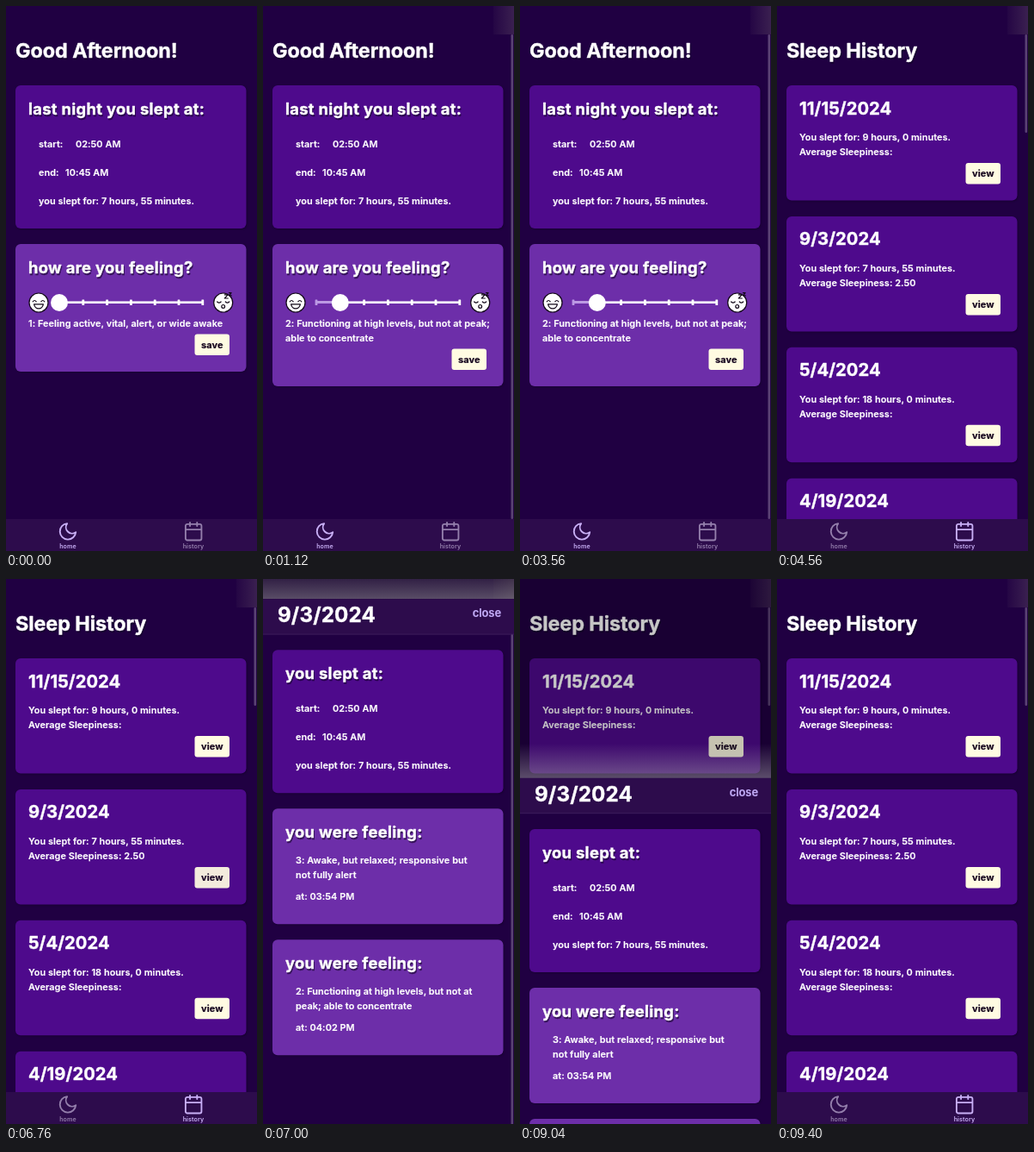
These frames come from a looping animation (292 by 632 pixels, 9600 ms). An HTML page:

```html
<!DOCTYPE html>
<html lang="en">
<head>
<meta charset="utf-8">
<title>Sleep diary</title>
<style>
  html, body { margin: 0; width: 100%; height: 100%; overflow: hidden; background: #200042; }
  svg { display: block; width: 100vw; height: 100vh; }
  text {
    font-family: Inter, "Open Sans", sans-serif;
    font-weight: 600; font-size: 10.9px; letter-spacing: .06px;
    fill: #fff; stroke: #fff; stroke-width: .2px; stroke-linejoin: round;
    white-space: pre;
  }
  .title, .head, .date, .big { font-weight: 700; stroke-width: .4px; }
  .title { font-size: 23.4px; letter-spacing: -.08px; }
  .head { font-size: 18.4px; letter-spacing: .3px; }
  .date { font-size: 20.2px; letter-spacing: .05px; }
  .big { font-size: 24.2px; letter-spacing: .15px; }
  .title, .head { filter: drop-shadow(1.2px 2px .6px rgba(15, 0, 35, .6)); }
  .card { filter: drop-shadow(1px 1px 1px rgba(10, 0, 25, .4)); }
  .btn { fill: #17071f; stroke: #17071f; font-weight: 700; font-size: 11px; }
  .ask { font-size: 11.6px; font-weight: 700; letter-spacing: -.06px; }
  .link { fill: #c3adf8; stroke: #c3adf8; font-size: 12px; }
  .strong { font-weight: 700; }
  .close { font-size: 13px; letter-spacing: -.1px; }
  .tab text { font-size: 7.1px; letter-spacing: .1px; stroke: none; fill: currentColor; }
  .icon { fill: none; stroke: currentColor; stroke-width: 1.8; stroke-linecap: round; stroke-linejoin: round; }
  .ink { fill: none; stroke: #120818; stroke-width: 1.2; stroke-linecap: round; stroke-linejoin: round; }
  .ink.face { fill: #fff; }
</style>
</head>
<body>
<svg id="stage" viewBox="0 0 292 632" preserveAspectRatio="none"></svg>
<script>
const W = 292, H = 632, LOOP = 9600, STEP = 40;
const BG = '#200042', DEEP = '#4e0a8c', SOFT = '#6d2ea9', BAR = '#2d0c4c', CREAM = '#fffbe2';
const SCROLL = '#5b4274', ACTIVE = '#c9b0f6', IDLE = '#947fac';

const rect = (x, y, w, h, fill, r = 0, more = '') =>
  `<rect x="${x}" y="${y}" width="${w}" height="${h}" rx="${r}" fill="${fill}" ${more}/>`;
const text = (x, y, str, cls = '', anchor = 'start') =>
  `<text x="${x}" y="${y}" class="${cls}" text-anchor="${anchor}">${str}</text>`;
const group = (id, body, more = '') => `<g id="${id}" ${more}>${body}</g>`;
const ink = d => `<path class="ink" d="${d}"/>`;
const card = (y, h, fill) => rect(11, y, 268.5, h, fill, 6, 'class="card"');
const button = (y, label, id = '') =>
  group(id, rect(219.5, y, 40.5, 24.5, CREAM, 3) + text(239.8, y + 16.2, label, 'btn', 'middle'));
const scrollbar = (y, h) => rect(288.5, y, 2.6, h, SCROLL, 1.3);

const sleepCard = (y, title) => card(y, 166, DEEP) +
  text(26, y + 34, title, 'head') +
  text(38, y + 72, 'start:') + text(81, y + 72, '02:50 AM') +
  text(38, y + 105, 'end:') + text(69, y + 105, '10:45 AM') +
  text(38, y + 138, 'you slept for: 7 hours, 55 minutes.');

const face = (x, body) =>
  `<g transform="translate(${x} 344)"><circle r="11" class="ink face"/>${body}</g>`;
const happyFace = face(38,
  ink('M-6.8-1.2q2-2.6 4 0M2.8-1.2q2-2.6 4 0') + ink('M-5.4 1.8h10.8q-1 5-5.4 5t-5.4-5z'));
const sleepyFace = face(252.7,
  ink('M-7-1q2.2 2.4 4.4 0M2.6-1q2.2 2.4 4.4 0') +
  '<circle class="ink" cy="4.4" r="1.9"/>' +
  ink('M1.6-9.2h3.8l-3.8 4.2h4M6.8-11.4h2.6l-2.6 3.2h2.8'));

function slider(level) {
  const x0 = 62, gap = 27.8, x = x0 + gap * (level - 1);
  let s = rect(x0, 342.4, gap * 6, 2.6, '#fff');
  for (let i = 0; i < 7; i++)
    s += rect(x0 + gap * i - 1.4, 340.4, 2.8, 6.6, i < level - 1 ? '#bb98e4' : '#fff', .5);
  if (level > 1) s += rect(x0, 342.4, x - x0, 2.6, '#bb98e4');
  return s + `<circle cx="${x}" cy="344" r="10" fill="#fff"/>`;
}
function feelCard(level, lines) {
  const extra = 17 * (lines.length - 1);
  return card(276, 148 + extra, SOFT) + text(26, 310, 'how are you feeling?', 'head') +
    slider(level) + happyFace + sleepyFace +
    lines.map((l, i) => text(26, 371.5 + 17 * i, l)).join('') +
    button(380.5 + extra, 'save');
}
function nightCard(i, date, hours, avg) {
  const y = 92 + 151.9 * i;
  return card(y, 133.5, DEEP) + text(26, y + 33.5, date, 'date') +
    text(26, y + 64, `You slept for: ${hours} minutes.`) +
    text(26, y + 81, 'Average Sleepiness: ' + avg) +
    button(y + 90, 'view', 'view' + i);
}
const moodCard = (y, lines, time) => card(y, 134, SOFT) +
  text(26, y + 34, 'you were feeling:', 'head') +
  lines.map((l, i) => text(38, y + 64 + 17 * i, l)).join('') +
  text(38, y + 106, 'at: ' + time);

const gradient = (id, dir, color, a, b) =>
  `<linearGradient id="${id}" ${dir}><stop offset="0" stop-color="${color}" stop-opacity="${a}"/>` +
  `<stop offset="1" stop-color="${color}" stop-opacity="${b}"/></linearGradient>`;

const defs = '<defs>' +
  gradient('glow', 'x1="0" y1="0" x2="0" y2="1"', '#b8b8b8', 0, .42) +
  gradient('edge', 'x1="0" y1="0" x2="1" y2="0"', '#503a5c', .1, .55) + '</defs>';

const home = text(11, 60, 'Good Afternoon!', 'title') + sleepCard(92, 'last night you slept at:') +
  group('mood1', feelCard(1, ['1: Feeling active, vital, alert, or wide awake'])) +
  group('mood2', feelCard(2, ['2: Functioning at high levels, but not at peak;', 'able to concentrate'])) +
  group('homeBar', scrollbar(33, 562));

const past = text(11, 60, 'Sleep History', 'title') +
  nightCard(0, '11/15/2024', '9 hours, 0', '') +
  nightCard(1, '9/3/2024', '7 hours, 55', '2.50') +
  nightCard(2, '5/4/2024', '18 hours, 0', '') +
  nightCard(3, '4/19/2024', '8 hours, 0', '') +
  scrollbar(33, 114);

const tabs = rect(0, 595, W, 37, BAR) +
  group('homeTab', '<path class="icon" transform="translate(59.6 597) scale(1.03)" d="M21 12.79A9 9 0 1 1 11.21 3 7 7 0 0 0 21 12.79z"/>' +
    text(72, 629, 'home', '', 'middle'), 'class="tab"') +
  group('pastTab', '<path class="icon" transform="translate(205.8 596.8) scale(1.03)" d="M5 4h14a2 2 0 0 1 2 2v14a2 2 0 0 1-2 2H5a2 2 0 0 1-2-2V6a2 2 0 0 1 2-2zM16 2v4M8 2v4M3 10h18"/>' +
    text(218, 629, 'history', '', 'middle'), 'class="tab"');

const dialog = rect(48, 278, 195, 78, '#32124f', 10, 'opacity=".97"') +
  text(145.3, 304, 'Are you sure you wanna save?', 'ask', 'middle') +
  rect(48, 322, 195, .8, '#54386f') + rect(144.8, 322, .8, 34, '#54386f') +
  text(95.5, 343, 'no', 'link', 'middle') + text(194.3, 343, 'yes', 'link strong', 'middle');

const sheet = rect(0, -40, W, 40, 'url(#glow)') + rect(0, 0, W, H + 2, BG) +
  rect(0, 0, W, 41, BAR) + rect(0, 40.4, W, .8, '#40215f') +
  text(17, 27, '9/3/2024', 'big') + text(277, 21, 'close', 'link close', 'end') +
  sleepCard(59, 'you slept at:') +
  moodCard(243, ['3: Awake, but relaxed; responsive but', 'not fully alert'], '03:54 PM') +
  moodCard(395, ['2: Functioning at high levels, but not at', 'peak; able to concentrate'], '04:02 PM') +
  group('sheetBar', scrollbar(41, 591));

document.getElementById('stage').innerHTML = defs + rect(0, 0, W, H, BG) +
  group('home', home) + group('past', past) + tabs +
  group('corner', rect(268, 0, 24, 33, 'url(#edge)')) +
  group('dim', rect(0, 0, W, H, '#000')) + group('dialog', dialog) + group('sheet', sheet);

const el = id => document.getElementById(id);
const clamp = v => Math.max(0, Math.min(1, v));
const ramp = (t, a, b) => clamp((t - a) / (b - a));
const ease = v => v * v * (3 - 2 * v);
const show = (id, on) => el(id).setAttribute('visibility', on ? 'inherit' : 'hidden');
const fade = (id, v) => el(id).setAttribute('opacity', v.toFixed(3));

// Critically damped spring: share of the distance still to go.
function spring(t, start) {
  const u = Math.max(0, t - start) * .0213;
  return (1 + u) * Math.exp(-u);
}

function draw(t) {
  const onHome = t < 4400;
  show('home', onHome);
  show('past', !onHome);
  show('mood1', t < 440);
  show('mood2', onHome && t >= 440);
  show('homeBar', t >= 1120 && onHome);
  show('corner', t >= 1120);
  el('homeTab').style.color = onHome ? ACTIVE : IDLE;
  el('pastTab').style.color = onHome ? IDLE : ACTIVE;

  const opening = ease(ramp(t, 1960, 2200));
  const ask = opening * (1 - ease(ramp(t, 3240, 3560)));
  const scale = 1 + .15 * (1 - opening);
  fade('dialog', ask);
  el('dialog').setAttribute('transform', `translate(145.5 317) scale(${scale}) translate(-145.5 -317)`);

  let away = 1;
  if (t >= 6760 && t < 7240) away = spring(t, 6760);
  else if (t >= 7240 && t < 9000) away = 0;
  else if (t >= 9000 && t < 9400) away = 1 - spring(t, 8980);
  show('sheet', away < 1);
  el('sheet').setAttribute('transform', `translate(0 ${(away * H).toFixed(2)})`);
  fade('sheetBar', 1 - ramp(t, 8120, 8360));
  fade('dim', .3 * ask + .35 * (1 - away));
  fade('view1', 1 - .5 * ramp(t, 6740, 6900) + .5 * ramp(t, 6900, 7100));
}

let start;
function tick(now) {
  if (start === undefined) start = now;
  const t = (now - start) % LOOP;
  draw(Math.floor(t / STEP) * STEP);
  requestAnimationFrame(tick);
}
draw(0);
requestAnimationFrame(tick);
</script>
</body>
</html>
```
